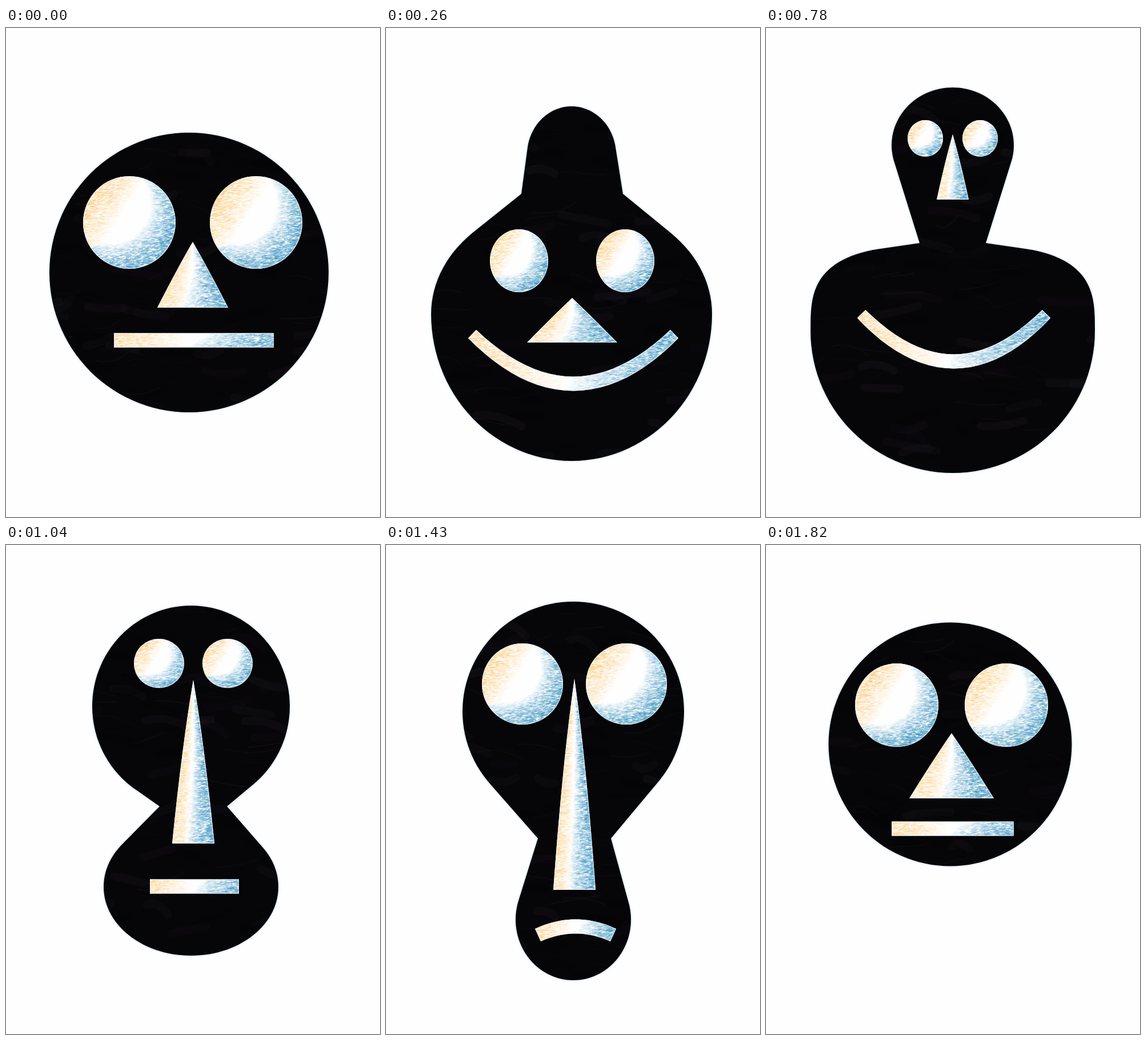
These frames come from a looping animation (655x855 px, 1950 ms). An HTML page with a canvas:

```html
<!DOCTYPE html>
<html lang="en">
<head>
<meta charset="utf-8">
<title>Shifting mask</title>
<style>
  html, body { margin: 0; width: 100%; height: 100%; overflow: hidden; background: #fefefe; }
  canvas { display: block; width: 655px; height: 855px; }
</style>
</head>
<body>
<canvas id="stage" width="655" height="855"></canvas>
<script>
const ctx = document.getElementById('stage').getContext('2d');
const STEP = 130, STEPS = 15;

// axis: body x, face x    head: y, rx, ry     trunk: y, rx, height above, height below
// neck: y, half width     eyes: y, distance from axis, rx, ry
// nose: tip y, base y, half width              mouth: y, half width, bend
const disc = (y, r) => ({ head: [y, r, r], trunk: [y, r, r, r], neck: [y, r / 4] });
const poses = [
  { at: 0, axis: [320.5, 327], ...disc(427.5, 244.5),
    eyes: [340, 111, 81, 81], nose: [374, 489, 62], mouth: [546, 140, 0] },
  { at: 2, axis: [325, 326], head: [222, 78, 85], trunk: [500, 246, 200, 257], neck: [290, 89],
    eyes: [407, 93, 51, 55], nose: [472, 550, 79], mouth: [535, 177, 87] },
  { at: 4, axis: [328, 330], head: [215, 83, 90], trunk: [530, 246, 158, 245], neck: [350, 60],
    eyes: [216, 44, 31, 53], nose: [229, 480, 43], mouth: [483, 177, 98] },
  { at: 6, axis: [327, 327], head: [205, 107, 101], trunk: [530, 249, 150, 248], neck: [376, 58],
    eyes: [193, 48, 31, 32], nose: [186, 300, 28], mouth: [500, 162, 83] },
  { at: 8, axis: [324, 328], head: [282, 173, 176], trunk: [598, 153, 120, 120], neck: [457, 59],
    eyes: [207, 60, 44, 43], nose: [236, 522, 37], mouth: [597, 78, 0] },
  { at: 11, axis: [328, 330], head: [291, 194, 192], trunk: [655, 101, 106, 106], neck: [513, 64],
    eyes: [243, 91, 71, 71], nose: [234, 603, 37], mouth: [682, 66, -15] },
  { at: 14, axis: [322.5, 325], ...disc(348.5, 213),
    eyes: [280, 96, 73, 73], nose: [329, 443, 74], mouth: [496, 107, 0] }
];

const COOL = ['#1f77b8', '#3c93cc', '#67b1dd', '#27918f', '#2b84c2'];
const WARM = ['#fbcf60', '#fbc97a', '#fddd82', '#f3a868'];

const clamp = v => Math.max(0, Math.min(1, v));
const power = (v, p) => Math.sign(v) * Math.abs(v) ** p;

function random(seed) {
  return () => {
    seed = seed + 0x6D2B79F5 | 0;
    let t = Math.imul(seed ^ seed >>> 15, 1 | seed);
    t = t + Math.imul(t ^ t >>> 7, 61 | t) ^ t;
    return ((t ^ t >>> 14) >>> 0) / 4294967296;
  };
}

function poseAt(step) {
  const a = poses.findLast(p => p.at <= step);
  const b = poses.find(p => p.at > step) || a;
  const f = a === b ? 0 : (step - a.at) / (b.at - a.at);
  const pose = {};
  for (const key in a) {
    if (key !== 'at') pose[key] = a[key].map((v, i) => v + (b[key][i] - v) * f);
  }
  return pose;
}

// An oval whose upper half gets squarer shoulders the broader it is.
function lobe(cx, cy, rx, up, down = up) {
  const square = Math.max(2, (rx / up) ** 2 + .4), pts = [];
  for (let i = 0; i < 120; i++) {
    const a = i * Math.PI / 60, c = Math.cos(a), s = Math.sin(a);
    const p = 2 / (s < 0 ? square : 2);
    pts.push([cx + rx * power(c, p), cy + (s < 0 ? up : down) * power(s, p)]);
  }
  return pts;
}

function hull(pts) {
  const half = list => {
    const out = [];
    for (const p of list) {
      while (out.length > 1) {
        const [a, b] = out.slice(-2);
        if ((b[0] - a[0]) * (p[1] - a[1]) > (b[1] - a[1]) * (p[0] - a[0])) break;
        out.pop();
      }
      out.push(p);
    }
    return out.slice(0, -1);
  };
  const sorted = [...pts].sort((a, b) => a[0] - b[0] || a[1] - b[1]);
  return [...half(sorted), ...half(sorted.reverse())];
}

function polygon(pts, path = new Path2D()) {
  pts.forEach((p, i) => i ? path.lineTo(...p) : path.moveTo(...p));
  path.closePath();
  return path;
}

// Head and trunk are each pulled taut around the same two neck points.
function bodyPath({ axis: [x, face], head, trunk, neck: [y, half] }) {
  const neck = [[face - half, y], [face + half, y]];
  const path = polygon(hull([...lobe(x, ...head), ...neck]));
  return polygon(hull([...lobe(x, ...trunk), ...neck]), path);
}

function nosePath(x, [tip, base, half]) {
  const path = new Path2D(), h = base - tip, w = half * .4 + h / 60;
  path.moveTo(x, tip);
  path.quadraticCurveTo(x + w, tip + h * .4, x + half, base);
  path.lineTo(x - half, base);
  path.quadraticCurveTo(x - w, tip + h * .4, x, tip);
  return path;
}

function mouthPath(x, [y, half, bend]) {
  const top = [], low = [];
  for (let i = -12; i <= 12; i++) {
    const u = i / 12, slope = -2 * bend * u / half, len = Math.hypot(1, slope);
    const thick = 12.5 - Math.abs(bend) * u * u / 35;
    const px = x + half * u, py = y + bend * (1 - u * u);
    const dx = slope / len * thick, dy = thick / len;
    top.push([px + dx, py - dy]);
    low.unshift([px - dx, py + dy]);
  }
  return polygon([...top, ...low]);
}

// Tones take box coordinates from -1 to 1 and give [cool, warm].
const tones = {
  eye: (x, y) => [clamp((Math.hypot(x + .4, y + .4) - .85) * 1.1), clamp(-x * .8 - y * .5 - .2)],
  nose: (x, y) => {
    const u = x / Math.max(.15, (y + 1) / 2);
    return [clamp(u * .6 + y * .2 + .02), clamp(-u * .65 - .08)];
  },
  mouth: (x, y) => [clamp(x * .75 + y * .1 - .03), clamp(-x * .7 - .05)]
};

function crayon(path, cx, cy, rx, ry, tone, rnd) {
  ctx.save();
  ctx.fillStyle = '#fefefe';
  ctx.fill(path);
  ctx.clip(path);
  for (let n = rx * ry * 1.3; n > 0; n--) {
    const x = rnd() * 2 - 1, y = rnd() * 2 - 1;
    const [cool, warm] = tone(x, y);
    const pick = rnd(), len = 3 + rnd() * 5, tilt = (rnd() - .7) * 2.5;
    if (cool + warm < .02) continue;
    const colors = cool > warm ? COOL : WARM;
    ctx.globalAlpha = Math.min(.4, cool > warm ? cool * .5 : warm * .4);
    ctx.strokeStyle = colors[pick * colors.length | 0];
    ctx.lineWidth = 1 + pick * .6;
    const px = cx + x * rx, py = cy + y * ry;
    ctx.beginPath();
    ctx.moveTo(px - len / 2, py);
    ctx.lineTo(px + len / 2, py + tilt);
    ctx.stroke();
  }
  ctx.globalAlpha = .75;
  ctx.strokeStyle = '#e9f5fc';
  ctx.lineWidth = 2.4;
  ctx.stroke(path);
  ctx.restore();
}

function ink(path, rnd) {
  ctx.save();
  ctx.lineJoin = ctx.lineCap = 'round';
  ctx.strokeStyle = 'rgba(190, 224, 245, .28)';
  ctx.lineWidth = 5;
  ctx.stroke(path);
  ctx.fillStyle = '#060508';
  ctx.fill(path);
  ctx.clip(path);
  for (let i = 0; i < 260; i++) {
    const x = 40 + rnd() * 530, y = 100 + rnd() * 680;
    const len = 30 + rnd() * 60, bend = (rnd() - .5) * 24, drop = (rnd() - .5) * 40;
    const shade = rnd() < .5 ? '0, 0, 0' : '34, 31, 39';
    ctx.strokeStyle = `rgba(${shade}, ${.1 + rnd() * .15})`;
    ctx.lineWidth = rnd() < .3 ? 14 : .8 + rnd() * 2;
    ctx.beginPath();
    ctx.moveTo(x, y);
    ctx.quadraticCurveTo(x + len / 2, y + bend, x + len, y + drop);
    ctx.stroke();
  }
  ctx.restore();
}

function draw(step) {
  const pose = poseAt(step), rnd = random(step * 97 + 11), x = pose.axis[1];
  ctx.fillStyle = '#fefefe';
  ctx.fillRect(0, 0, 655, 855);
  ink(bodyPath(pose), rnd);

  const [eyeY, apart, rx, ry] = pose.eyes;
  for (const cx of [x - apart, x + apart]) {
    const path = new Path2D();
    path.ellipse(cx, eyeY, rx, ry, 0, 0, Math.PI * 2);
    crayon(path, cx, eyeY, rx, ry, tones.eye, rnd);
  }

  const [tip, base, wide] = pose.nose;
  crayon(nosePath(x, pose.nose), x, (tip + base) / 2, wide, (base - tip) / 2, tones.nose, rnd);

  const [lipY, half, bend] = pose.mouth;
  crayon(mouthPath(x + 2, pose.mouth), x + 2, lipY + bend / 2, half + 10,
    Math.abs(bend) / 2 + 14, tones.mouth, rnd);
}

const start = performance.now();
let shown = -1;
function tick() {
  const step = Math.floor((performance.now() - start) / STEP) % STEPS;
  if (step !== shown) draw(shown = step);
  requestAnimationFrame(tick);
}
tick();
</script>
</body>
</html>
```
